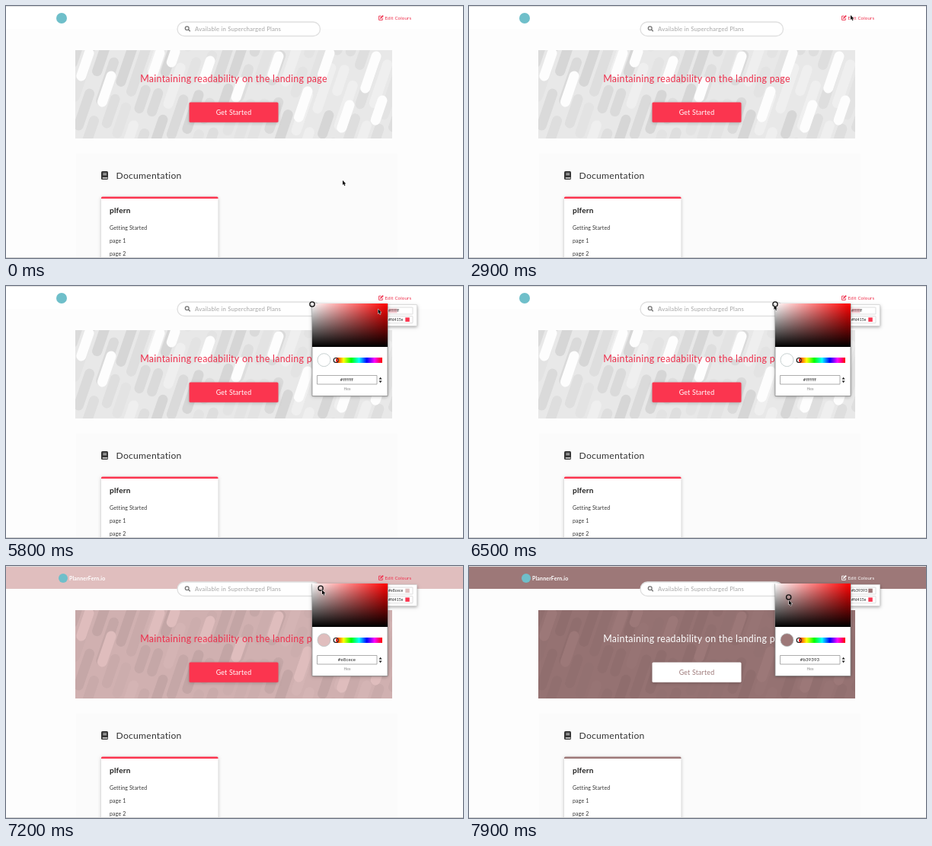
An HTML page with a canvas for the animation above (8000 ms loop, 600 px wide and 331 px high).

```html
<!DOCTYPE html>
<html lang="en">
<head>
<meta charset="utf-8">
<title>Colour editor</title>
<style>
html, body { margin: 0; width: 100%; height: 100%; overflow: hidden; background: #fdfdfd; }
canvas { display: block; width: 600px; height: 331px; }
</style>
</head>
<body>
<canvas id="stage"></canvas>
<script>
const W = 600, H = 331, LOOP = 8000, STEP = 100;
const RED = '#fb354f', LINK = '#ee2f4c', SANS = 'Lato, "Open Sans", sans-serif';
const canvas = document.getElementById('stage');
const scale = window.devicePixelRatio || 1;
canvas.width = W * scale;
canvas.height = H * scale;
const c = canvas.getContext('2d');
c.scale(scale, scale);

// Each key is [time, x, y] or [time, value, floor]
const pointerKeys = [
  [100, 442, 229], [500, 482, 106], [900, 514, 16], [1100, 513, 14],
  [1600, 510, 14], [2100, 501, 12], [2900, 501, 12], [3300, 511, 13],
  [3700, 508, 14], [4000, 508, 15], [4600, 518, 32], [5600, 518, 32],
  [6400, 400, 25], [6600, 401, 25], [7200, 415, 31.5], [7400, 419, 37],
  [7900, 420, 45]
];
const colourKeys = [
  [6600, 255, 255], [7200, 232, 206], [7400, 202, 170], [7900, 179, 147]
];
const MENU_AT = 3900, PICKER_AT = 5200;

// Bright capsules in the banner: x and y of the upper end, length
const whites = [
  [109, 62, 30], [138, 92, 34], [202, 62, 26], [222, 60, 14], [268, 72, 24],
  [309, 100, 20], [358, 66, 24], [396, 112, 34], [425, 62, 28],
  [451, 130, 30], [486, 66, 42], [494, 124, 26]
];

function track(keys, t) {
  if (t <= keys[0][0]) return keys[0].slice(1);
  for (let i = 1; i < keys.length; i++) {
    const [t1, x1, y1] = keys[i];
    if (t <= t1) {
      const [t0, x0, y0] = keys[i - 1];
      const k = (t - t0) / (t1 - t0);
      return [x0 + (x1 - x0) * k, y0 + (y1 - y0) * k];
    }
  }
  return keys[keys.length - 1].slice(1);
}

function rect(x, y, w, h, fill) {
  c.fillStyle = fill;
  c.fillRect(x, y, w, h);
}

function round(x, y, w, h, r, fill, stroke, line = 1) {
  c.beginPath();
  c.roundRect(x, y, w, h, r);
  if (fill) { c.fillStyle = fill; c.fill(); }
  if (stroke) { c.strokeStyle = stroke; c.lineWidth = line; c.stroke(); }
}

function circle(x, y, r, fill, stroke, line = 1) {
  round(x - r, y - r, r * 2, r * 2, r, fill, stroke, line);
}

function poly(points, fill, stroke, line = 1) {
  c.beginPath();
  points.forEach(([x, y]) => c.lineTo(x, y));
  c.closePath();
  if (stroke) { c.strokeStyle = stroke; c.lineWidth = line; c.stroke(); }
  if (fill) { c.fillStyle = fill; c.fill(); }
}

function stroke(points, colour, line) {
  c.beginPath();
  points.forEach(([x, y]) => c.lineTo(x, y));
  c.strokeStyle = colour;
  c.lineWidth = line;
  c.stroke();
}

function text(str, x, y, size, fill, weight = 400, align = 'left') {
  c.font = `${weight} ${size}px ${SANS}`;
  c.letterSpacing = `${size * 0.022}px`;
  c.textAlign = align;
  c.fillStyle = fill;
  c.fillText(str, x, y);
}

function shadowed(blur, dy, alpha, draw) {
  c.save();
  c.shadowColor = `rgba(0,0,0,${alpha})`;
  c.shadowBlur = blur * scale;
  c.shadowOffsetY = dy * scale;
  draw();
  c.restore();
}

function seeded(seed) {
  return () => (seed = (seed * 16807) % 2147483647) / 2147483647;
}

function theme(t) {
  const [hi, lo] = track(colourKeys, t).map(Math.round);
  const hex = '#' + [hi, lo, lo].map(v => v.toString(16).padStart(2, '0')).join('');
  const tone = v => Math.round(255 * Math.pow(v / 255, 1.37));
  const paint = `rgb(${tone(hi)},${tone(lo)},${tone(lo)})`;
  const light = hi * 0.299 + lo * 0.701 > 186;
  return {
    hex, paint, light,
    veil: 1 - lo / 255,
    accent: light ? RED : paint,
    link: light ? LINK : '#fff',
    x: 402 + 99 * (1 - lo / hi),
    y: 24 + 57 * (1 - hi / 255)
  };
}

function capsule(x, y, len, colour) {
  c.lineCap = 'round';
  stroke([[x, y], [x - len * 0.34, y + len]], colour, 13);
  c.lineCap = 'butt';
}

function pattern() {
  const rnd = seeded(4217);
  const greys = ['#d6d6d6', '#dadada', '#dedede', '#e3e3e3', '#efefef'];
  rect(91, 58, 416, 116, '#e8e8e8');
  for (let x = 93; x < 560; x += 18) {
    let y = 30 - rnd() * 50;
    while (y < 190) {
      const len = 20 + rnd() * 38;
      const shade = greys[Math.floor(rnd() * greys.length)];
      capsule(x - (y - 58) * 0.34, y, len, shade);
      y += len + 18 + rnd() * 14;
    }
  }
  whites.forEach(([x, y, len]) => capsule(x, y, len, '#fdfdfd'));
}

function editIcon(colour) {
  stroke([[492.6, 13.2], [489.6, 13.2], [489.6, 18.4], [494.3, 18.4], [494.3, 16]], colour, 0.9);
  stroke([[491.4, 16.5], [495.2, 12.6]], colour, 1.7);
}

function header(th) {
  rect(0, 0, W, 30, th.paint);
  rect(0, 0, W, 1, '#dedede');
  const white = th.hex === '#ffffff';
  circle(white ? 73 : 75, 16, white ? 7 : 6, '#6fbfca');
  if (!white) text('PlannerFern.io', 83, 18.6, 7, '#fff', 700);
  editIcon(th.link);
  text('Edit Colours', 497.5, 17.6, 6.2, th.link);
  round(225, 21, 187.5, 18.5, 9.25, '#fff', '#e0e0e0', 1.4);
  circle(237.7, 29.2, 2.4, null, '#777', 1.3);
  stroke([[239.5, 31], [241.8, 33.3]], '#777', 1.5);
  text('Available in Supercharged Plans', 248, 32.8, 7.8, '#a6a6a6');
}

function hero(th) {
  c.save();
  c.beginPath();
  c.rect(91, 58, 416, 116);
  c.clip();
  pattern();
  rect(91, 58, 416, 116, `rgba(255,255,255,${th.veil})`);
  c.globalCompositeOperation = 'multiply';
  rect(91, 58, 416, 116, th.paint);
  c.restore();
  text('Maintaining readability on the landing page', 299, 99.8, 12.4, th.link, 400, 'center');
  shadowed(4, 1, 0.22, () => round(240.5, 126.5, 117, 26.3, 1.5, th.light ? RED : '#fff'));
  text('Get Started', 299, 142.5, 8.8, th.light ? '#fff' : th.paint, 400, 'center');
}

function docs(th) {
  rect(92, 194, 422, 137, '#fbfbfb');
  round(125, 217, 9, 11, 1.5, '#333');
  rect(127.3, 219.5, 4.8, 0.8, '#fff');
  rect(127.3, 221.4, 4.8, 0.8, '#fff');
  rect(126.7, 225.3, 6.6, 1.3, '#fff');
  text('Documentation', 144.5, 226.8, 12.1, '#333');
  shadowed(4, 1, 0.25, () => round(125, 250.5, 153.5, 90, 1.5, '#fff'));
  round(125, 250.5, 153.5, 2.6, [1.5, 1.5, 0, 0], th.accent);
  text('plfern', 136, 272.3, 10, '#222', 700);
  ['Getting Started', 'page 1', 'page 2'].forEach((s, i) =>
    text(s, 136, 293.5 + i * 17.1, 7, '#333'));
  rect(0, 330, W, 1, '#cfcfcf');
}

function field(y, value, swatch) {
  round(500, y, 34, 9, 0.5, '#fff', '#cfcfcf', 0.7);
  text(value, 502, y + 6.4, 5, '#222');
  if (swatch) rect(524.3, y + 1.7, 5.5, 5.5, swatch);
}

function menu(th, t) {
  shadowed(4, 1, 0.35, () => rect(454.5, 24.5, 85, 28, '#fff'));
  round(454.5, 24.5, 85, 28, 0.5, null, '#d2d2d2', 0.7);
  text('Header Colour', 460, 34.4, 5.1, '#444');
  text('Link Colour', 460, 46, 5.1, '#444');
  field(28, th.hex, th.hex === '#ffffff' ? null : th.paint);
  if (t >= 5600 && t <= 6600) rect(502, 29.5, 11.5, 6, 'rgba(220,90,110,.3)');
  field(39.7, '#fd415e', RED);
}

function gradient(x0, y0, x1, y1, stops) {
  const g = c.createLinearGradient(x0, y0, x1, y1);
  stops.forEach((s, i) => g.addColorStop(i / (stops.length - 1), s));
  return g;
}

function picker(th) {
  shadowed(4, 1, 0.35, () => rect(402, 23, 99, 121, '#fff'));
  round(402, 23.5, 99, 121, 0, null, '#8d8d8d', 0.8);
  rect(402, 23, 99, 57, gradient(402, 0, 501, 0, ['#fff', '#f00']));
  rect(402, 23, 99, 57, gradient(0, 23, 0, 80, ['rgba(0,0,0,0)', '#000']));
  circle(417.5, 97.2, 8.5, th.paint, '#b9c4c4', 0.8);
  const hues = ['#f00', '#ff0', '#0f0', '#0ff', '#00f', '#f0f', '#f00'];
  rect(433, 94, 61, 7, gradient(433, 0, 494, 0, hues));
  circle(433.2, 97.5, 3, '#fff', '#111', 1.1);
  rect(433.2, 95.5, 2, 4, '#f00');
  round(408.5, 117.5, 78.5, 11.5, 0, '#fff', '#999', 0.8);
  text(th.hex, 447.5, 125.4, 6.1, '#222', 400, 'center');
  poly([[489.6, 122.6], [491.6, 119.8], [493.6, 122.6]], '#222');
  poly([[489.6, 124.4], [491.6, 127.2], [493.6, 124.4]], '#222');
  text('Hex', 448, 137.2, 5, '#888', 400, 'center');
  circle(th.x, th.y, 3.1, null, '#111', 1.3);
}

function pointer(x, y, beam) {
  if (beam) {
    stroke([[x, y - 3.5], [x, y + 3.5]], '#222', 1);
    stroke([[x - 1.8, y - 3.8], [x + 1.8, y - 3.8]], '#222', 0.9);
    stroke([[x - 1.8, y + 3.8], [x + 1.8, y + 3.8]], '#222', 0.9);
    return;
  }
  const shape = [[0, 0], [0, 6], [1.4, 4.8], [2.4, 7.2], [3.4, 6.8], [2.5, 4.5], [4.3, 4.5]];
  poly(shape.map(([dx, dy]) => [x + dx, y + dy]), '#000', '#fff', 1);
}

function draw(t) {
  const th = theme(t);
  rect(0, 0, W, H, '#fdfdfd');
  header(th);
  hero(th);
  docs(th);
  if (t >= MENU_AT) menu(th, t);
  if (t >= PICKER_AT) picker(th);
  const [x, y] = track(pointerKeys, t);
  pointer(x, y, t >= MENU_AT && x > 501 && y > 27);
}

function tick(now) {
  draw(Math.floor((now % LOOP) / STEP) * STEP);
  requestAnimationFrame(tick);
}
draw(0);
requestAnimationFrame(tick);
</script>
</body>
</html>
```
